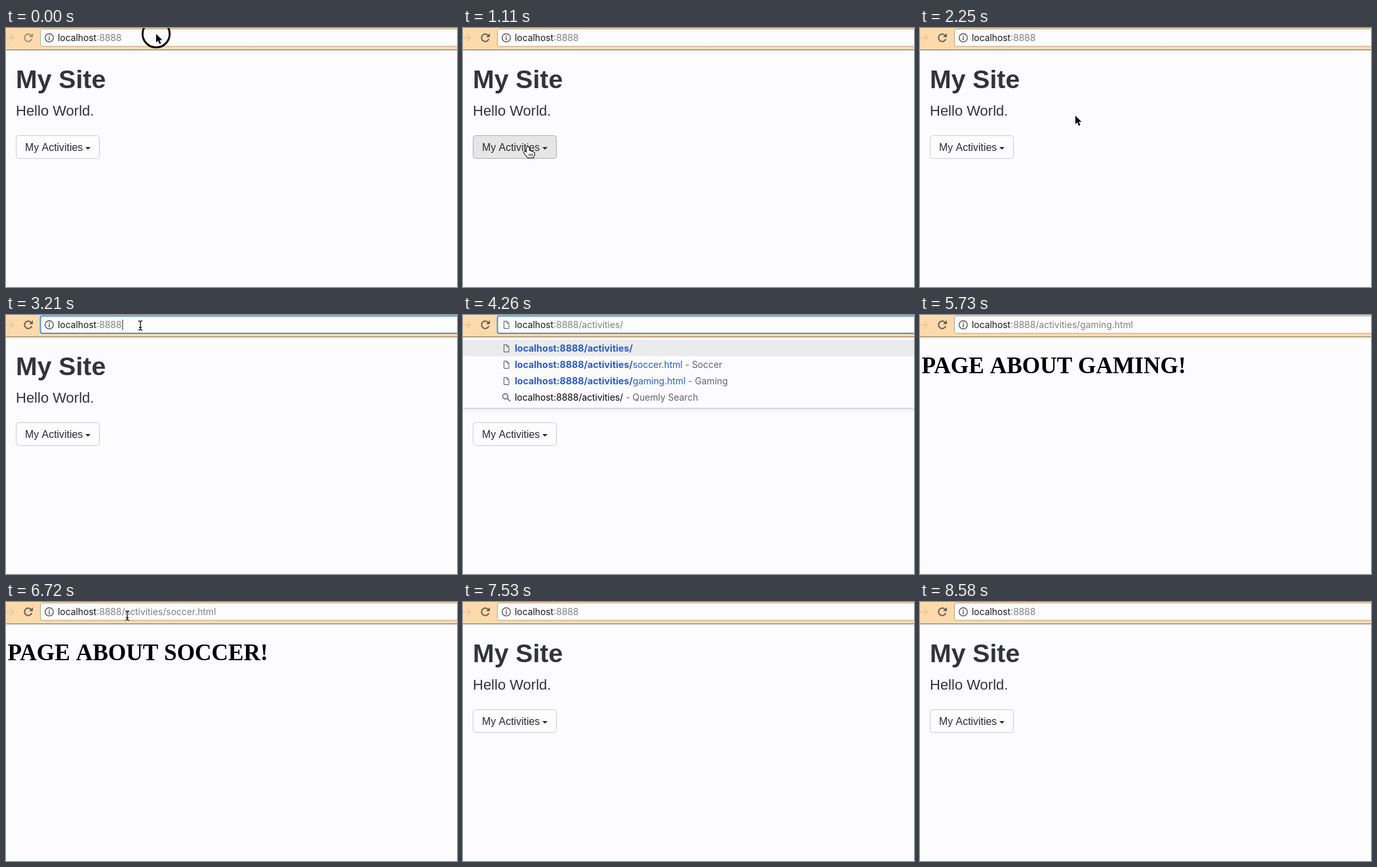
These frames come from a looping animation (688x396 px, 8610 ms). An HTML page with a canvas:

```html
<!DOCTYPE html>
<html lang="en">
<head>
<meta charset="utf-8">
<title>My Site</title>
<style>
  html, body { margin: 0; width: 100%; height: 100%; overflow: hidden; background: #fcfcff; }
  canvas { display: block; }
</style>
</head>
<body>
<canvas width="688" height="396"></canvas>
<script>
const ctx = document.querySelector('canvas').getContext('2d');
const LOOP = 8610;
const HOST = 'localhost:8888';
const DIR = '/activities/';
const GAMING = DIR + 'gaming.html';
const SOCCER = DIR + 'soccer.html';
const UI = '13.85px Inter, Roboto, sans-serif';
const UI_BOLD = 'bold 14.2px Inter, Roboto, sans-serif';
const SANS = '"Liberation Sans", Arial, sans-serif';
const BLUE = '#2a5bcb', GREY = '#808080', ICON = '#5a5a5a';
const PAGES = [[DIR, ''], [SOCCER, 'Soccer'], [GAMING, 'Gaming']];

// Address edits: start, end, path before, path after
const EDITS = [
  [3300, 4150, '', DIR],
  [4400, 4900, DIR, GAMING],
  [5980, 6440, DIR + 's', SOCCER],
  [6990, 7270, SOCCER, '']
];
// Address bar sessions: focus, first edit, enter
const SESSIONS = [[3050, 3300, 5000], [5900, 5980, 6520], [6880, 6990, 7350]];
const CLICKS = [0, 3050, 6880];
// Pointer routes: time, x, y
const ROUTES = [
  [[0, 229, 9], [240, 229, 9], [870, 104, 178], [1110, 98, 182], [1350, 98, 184],
   [1620, 112, 204], [2250, 237, 134], [2550, 237, 134], [2940, 205, 16], [3270, 205, 16]],
  [[6570, 215, 106], [6720, 185, 21], [6990, 185, 18]]
];

function text(str, x, y, font, color) {
  ctx.font = font;
  ctx.fillStyle = color;
  ctx.fillText(str, x, y);
  return x + ctx.measureText(str).width;
}

function rect(x, y, w, h, color) {
  ctx.fillStyle = color;
  ctx.fillRect(x, y, w, h);
}

function strokePath(color, width) {
  ctx.strokeStyle = color;
  ctx.lineWidth = width;
  ctx.stroke();
}

function box(x, y, w, h, r, fill, stroke, width = 1) {
  ctx.beginPath();
  ctx.roundRect(x, y, w, h, r);
  ctx.fillStyle = fill;
  ctx.fill();
  strokePath(stroke, width);
}

function arc(x, y, r, color, width, from = 0, to = 2 * Math.PI) {
  ctx.beginPath();
  ctx.arc(x, y, r, from, to);
  strokePath(color, width);
}

function shape(d, x, y, fill, stroke, width = 1) {
  ctx.save();
  ctx.translate(x, y);
  const path = new Path2D(d);
  if (stroke) {
    ctx.strokeStyle = stroke;
    ctx.lineWidth = width;
    ctx.stroke(path);
  }
  if (fill) {
    ctx.fillStyle = fill;
    ctx.fill(path);
  }
  ctx.restore();
}

function pathAt(t) {
  let path = '';
  for (const [start, end, from, to] of EDITS) {
    if (t < start) break;
    const k = Math.min(1, (t - start) / (end - start));
    const n = Math.round(from.length + (to.length - from.length) * k);
    path = (to.length > from.length ? to : from).slice(0, n);
  }
  return path;
}

function pointerAt(t) {
  const route = ROUTES.find(r => t >= r[0][0] && t < r.at(-1)[0]);
  if (!route) return null;
  const i = route.findIndex(p => p[0] > t);
  const [t0, x0, y0] = route[i - 1], [t1, x1, y1] = route[i];
  const u = (t - t0) / (t1 - t0), k = u * u * (3 - 2 * u);
  return { x: x0 + (x1 - x0) * k, y: y0 + (y1 - y0) * k };
}

function docIcon(y) {
  shape('M.5.5H5L8 3.5V11.5H.5ZM5 .5V3.5H8', 62, y - 6, '', ICON);
}

function drawHome(hover) {
  text('My Site', 15, 92, `bold 39.2px ${SANS}`, '#323436');
  text('Hello World.', 15, 134, `22px ${SANS}`, '#323436');
  box(15.5, 164.5, 127, 35, 4, hover ? '#e6e6e6' : '#fdfdff', hover ? '#adadad' : '#cccccc');
  text('My Activities', 29, 188, `15.9px ${SANS}`, '#292b2c');
  shape('M0 0H8L4 4Z', 121, 182, '#292b2c');
}

function drawBar(t, path, focused, editing) {
  rect(0, 0, 688, 33, '#fddaac');
  rect(0, 33, 688, 1, '#786a5c');
  const early = t < 300;
  shape('M0 15H11M6 9.5L11.5 15L6 20.5', 0, 0, '', '#e6c49c', 1.5);

  const ink = early ? '#a08c70' : '#665e56';
  arc(34, 15, 5.7, ink, 2, .35, 5.5);
  shape('M41 8V14H35Z', 0, 0, ink);

  box(52.5, 1.5, 650, 26.5, 3, '#fdfdff', focused ? '#4d94d6' : '#b9a48c', focused ? 2 : 1);
  if (editing) {
    docIcon(15);
  } else {
    arc(66, 15, 6.3, ICON, 1.4);
    rect(65.2, 11.5, 1.6, 1.7, ICON);
    rect(65.2, 14.2, 1.6, 4.5, ICON);
  }
  const x = text('localhost', 79, 20, UI, '#1a1a1a');
  const end = text(':8888' + path, x, 20, UI, GREY);
  if (focused && t % 1000 < 250) rect(end + 1, 7, 1, 16, '#222222');
}

function drawSuggestions(path) {
  const rows = PAGES.filter(p => p[0].startsWith(path));
  const bottom = 38 + 25 * (rows.length + 1);
  rect(0, 34, 688, bottom - 24, '#fcfcff');
  rect(0, 38, 688, 25, '#ebebeb');
  rect(0, bottom + 4, 688, 1, '#c4c4cc');
  rect(0, bottom + 5, 688, 2, '#ececf2');
  rect(0, bottom + 7, 688, 3, '#f6f6fa');

  rows.forEach(([url, title], i) => {
    const y = 51 + 25 * i;
    docIcon(y);
    let x = text(HOST + path, 79, y + 5, UI_BOLD, BLUE);
    x = text(url.slice(path.length), x, y + 5, UI, BLUE);
    if (title) text(`- ${title}`, x + 4, y + 5, UI, '#646464');
  });

  const y = bottom - 12;
  arc(64.5, y - 1.5, 4, ICON, 1.4);
  shape('M67.5 1.5L72 6', 0, y, '', ICON, 1.6);
  const x = text(HOST + path, 79, y + 5, UI, '#050505');
  text('- Quemly Search', x + 4, y + 5, UI, '#646464');
}

function drawPointer({ x, y }, hover, overBar, clicked) {
  if (clicked) arc(x, y, 20.7, '#080808', 3);
  if (hover) {
    const hand = 'M-1 1Q1-1 3 1V6Q5 5 6 7Q8 6 9 8Q11 8 11 10V12L9 16H1L-5 9Q-5 7-3 7L-1 9Z';
    shape(hand, x, y, '#ffffff', '#111111', 2);
    shape('M3 10V14M5.5 10V14M8 10V14', x, y, '', '#111111');
  } else if (overBar) {
    const beam = 'M-3-7Q0-7 0-5Q0-7 3-7M0-5V5M-3 7Q0 7 0 5Q0 7 3 7M-2 3H2';
    shape(beam, x, y, '', '#ffffff', 3);
    shape(beam, x, y, '', '#111111', 1.3);
  } else {
    shape('M0 0V13L3 10.2L5.2 15.4L7.5 14.4L5.3 9.5H9.5Z', x, y, '#050505', '#ffffff', 2);
  }
}

function draw(t) {
  const path = pathAt(t);
  const session = SESSIONS.find(s => t >= s[0] && t < s[2]);
  const editing = session && t >= session[1];
  const pointer = pointerAt(t);
  const hover = pointer && pointer.x > 15 && pointer.x < 143 && pointer.y > 164 && pointer.y < 200;

  rect(0, 0, 688, 396, '#fcfcff');
  if (t < 5000 || t >= 7350) {
    drawHome(hover);
  } else {
    const topic = t < 6520 ? 'GAMING' : 'SOCCER';
    text(`PAGE ABOUT ${topic}!`, 2.4, 89, 'bold 35.3px "Liberation Serif", Times, serif', '#000000');
  }
  drawBar(t, path, session, editing);
  if (editing && path) drawSuggestions(path);
  if (pointer) {
    const clicked = CLICKS.some(c => t >= c && t < c + 150);
    drawPointer(pointer, hover, t > 300 && pointer.y < 30, clicked);
  }
}

const begin = performance.now();
function tick() {
  const t = (performance.now() - begin) % LOOP;
  draw(Math.floor(t / 30) * 30);
  requestAnimationFrame(tick);
}
tick();
</script>
</body>
</html>
```
